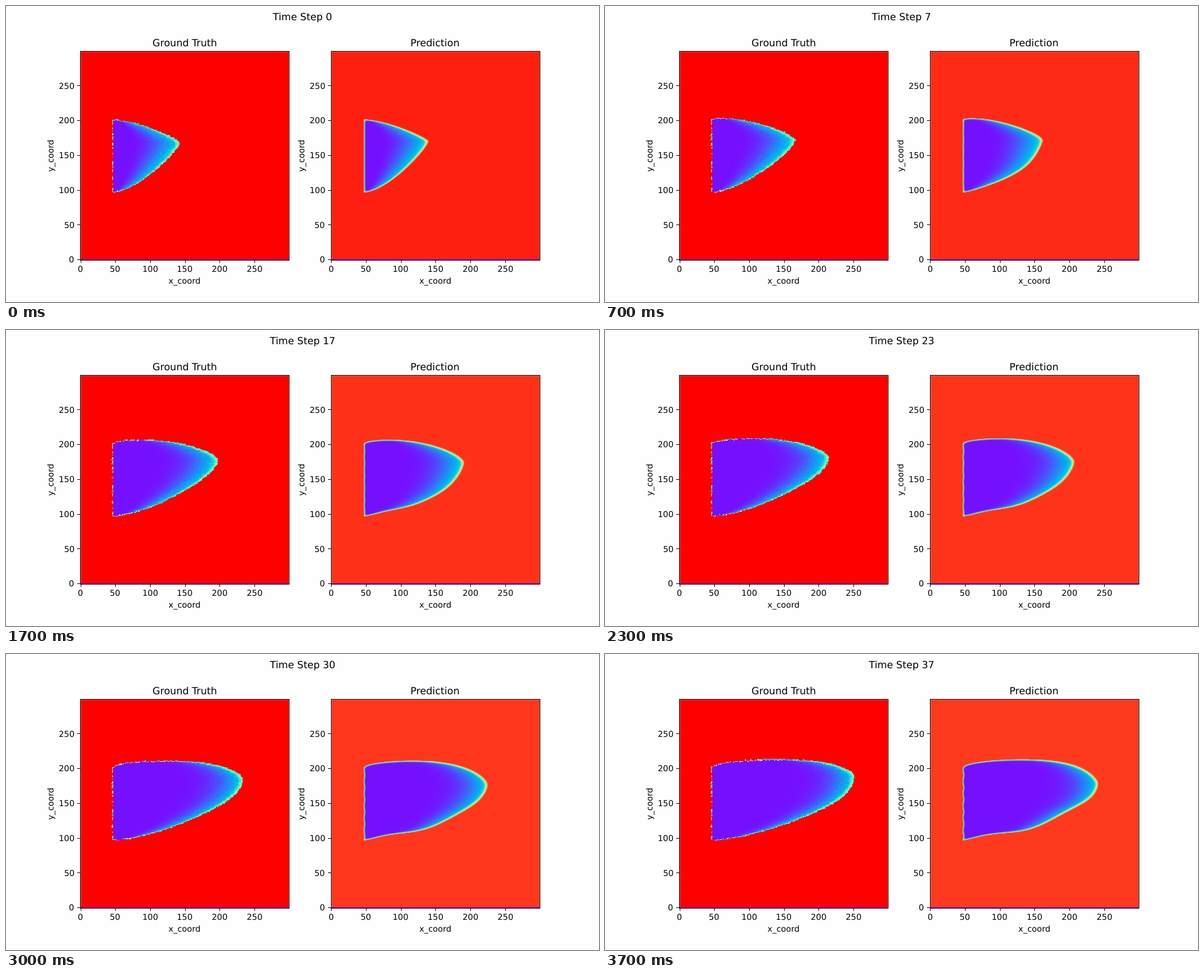
These frames come from a looping animation (1000 px wide and 500 px high, 3.8 s). An HTML page with a canvas:

```html
<!DOCTYPE html>
<html lang="en">
<head>
<meta charset="utf-8">
<title>Time Step</title>
<style>
  html, body { margin: 0; width: 100%; height: 100%; overflow: hidden; background: #fefefe; }
  canvas, svg { position: absolute; left: 0; top: 0; width: 1000px; height: 500px; }
  text { font-family: "DejaVu Sans", sans-serif; font-size: 13.89px; fill: #000; text-rendering: geometricPrecision; }
  .title { font-size: 16.67px; }
</style>
</head>
<body>
<canvas id="stage" width="1000" height="500"></canvas>
<svg id="axes" viewBox="0 0 1000 500"></svg>
<script>
const N = 300, STEPS = 38, STEP_MS = 100;
const SIZE = 352.27, TOP = 76.37, UNIT = SIZE / N;   // axes scale
const BOX = 353, BOX_TOP = 76, CELL = BOX / N;       // pixel-snapped image
const LEFT = 48;

const PANELS = [
  { x: 125, name: "Ground Truth", rough: true },
  { x: 547.73, name: "Prediction", rough: false }
];

const { sin, PI } = Math;
const clamp = v => Math.max(0, Math.min(1, v));
const mix = (a, b, t) => a + (b - a) * t;
const toRow = y => (y - BOX_TOP) / CELL;

function hash(x, y, z = 0) {
  const s = sin(x * 127.1 + y * 311.7 + z * 74.7) * 43758.5453;
  return s - Math.floor(s);
}

function rainbow(v) {
  return [
    255 * Math.min(1, Math.abs(2 * v - 0.5)),
    255 * sin(PI * v),
    255 * Math.cos(PI * v / 2)
  ];
}

// The plume at age 0..1: f runs from its flat left side (0) to the tip (1).
function plume(age, rough) {
  const tipX = (rough ? 169 + 148 * age : 165 + 140 * age) - 21 * age * age;
  const tipY = rough ? mix(231, 207, age) : mix(228, 219, age);
  const body = 0.93 - 0.2 * age;
  const climb = (f, p) => body * f ** p + (1 - body) * (1 - Math.sqrt(1 - f ** 14));
  const swell = 14 * age ** 0.7, bend = 1.6 + 4.4 * age * age;
  const bulge = rough ? 0 : 12 * sin(PI * age ** 0.6);
  const ripple = rough ? 0 : 4.5 * age;
  return {
    tip: tipX / CELL,
    upper: f => toRow(mix(191.5, tipY, climb(f, bend)) - swell * Math.sqrt(4 * f * (1 - f))),
    lower: f => toRow(mix(315, tipY, climb(f, 1.6))
      + bulge * sin(PI * f ** 3) - ripple * sin(2 * PI * f / 0.7) * (1 - f ** 4))
  };
}

function field({ rough }, k, put) {
  const age = k / (STEPS - 1);
  const { tip, upper, lower } = plume(age, rough);
  const length = tip - LEFT;
  const along = x => clamp((x - LEFT) / length);
  const back = rough ? 1 : 1 - Math.asin((31 + 26 * Math.sqrt(age)) / 255) / PI;
  const start = 0.3 + 0.2 * age, power = 1.6 + 1.8 * age;

  // Rightmost point of the plume in each row.
  const reach = new Float32Array(N).fill(-9);
  for (let x = LEFT; x <= tip; x += 0.25) {
    const f = along(x), end = lower(f) - 0.5;
    for (let y = Math.ceil(upper(f) - 0.5); y <= end; y++) reach[y] = x;
  }

  const up = [], low = [];
  for (let x = 0; x < N; x++) {
    const f = along(x + 0.5);
    const shake = z => rough ? (hash(x >> 1, z, k) - 0.5) * 1.8 : 0.3;
    up[x] = upper(f) - shake(1);
    low[x] = lower(f) + shake(2);
  }

  function value(x, y) {
    const cx = x + 0.5, cy = y + 0.5, f = along(cx);
    const spike = rough && hash(y >> 1, 5) > 0.42;
    if (spike && x >= 46 - (hash(y, 8) < 0.4 * age) && x < LEFT && cy > up[LEFT] && cy < low[LEFT])
      return hash(x, y, 3) > 0.35 ? 0.25 + 0.45 * hash(x, y, 4) : back;

    const side = rough ? LEFT : 47 + 0.5 * age * sin(y * 0.36);
    const dl = cx - side;
    const dx = reach[y] - cx + (rough ? (hash(y, 6, k) - 0.5) * 2.4 : 0.4);
    const dy = Math.min(cy - up[x], low[x] - cy);
    if (dl <= 0 || dx <= 0 || dy <= 0) return back;

    const d = 1 / Math.hypot(1 / dx, 1 / dy, rough ? 0 : 1 / dl);
    const q = clamp((cx - LEFT) / (reach[y] - LEFT));
    let v = 0.02 + 0.32 * clamp((q - start) / (1 - start)) ** power;
    if (rough) {
      v *= 0.9 + 0.2 * hash(x >> 1, y >> 1, k);
      if (d < 1.2) return hash(x, y, k) > 0.25 ? 0.3 + 0.4 * hash(x, y, k + 50) : v;
      return mix(v, 0.62, 0.8 * clamp(1 - d / (1.4 + 5 * f ** 3)) ** 1.3);
    }
    return mix(v, back, clamp(1 - d / (2.5 + 3 * f * f)) ** 1.3);
  }

  const base = rainbow(back), floor = rainbow(0);
  for (let y = 0; y < N; y++) {
    for (let x = 0; x < N; x++) {
      const near = y > 75 && y < 215 && x > 40 && x < tip + 3;
      put(x, y, y === N - 1 ? floor : near ? rainbow(value(x, y)) : base);
    }
  }
}

const ctx = document.getElementById("stage").getContext("2d");
const grid = document.createElement("canvas");
grid.width = grid.height = N;
const gridCtx = grid.getContext("2d");
const pixels = gridCtx.createImageData(N, N);

function put(x, y, rgb) {
  const i = (y * N + x) * 4;
  for (let c = 0; c < 3; c++) pixels.data[i + c] = rgb[c];
  pixels.data[i + 3] = 255;
}

const svg = document.getElementById("axes");

function add(tag, attrs) {
  const el = document.createElementNS("http://www.w3.org/2000/svg", tag);
  for (const name in attrs) el.setAttribute(name, attrs[name]);
  return svg.appendChild(el);
}

const bar = (x, y, width, height, fill = "#000") => add("rect", { x, y, width, height, fill });

// Sets text on whole pixels; align 0.5 centres it on x, 1 ends it there.
function place(el, text, x, y, align = 0.5) {
  el.textContent = text;
  el.setAttribute("x", Math.round(x - el.getComputedTextLength() * align));
  el.setAttribute("y", Math.round(y));
}

const label = (text, x, y, align) => place(add("text", {}), text, x, y, align);

function drawAxes({ x, name }) {
  const left = Math.round(x), right = left + 352, bottom = 429, mid = x + SIZE / 2;
  const pale = "rgba(255,250,200,.3)";
  bar(left + 1, 77, 1, 351, pale);
  bar(right - 1, 77, 1, 351, pale);
  bar(left + 2, 77, 349, 1, pale);
  bar(left, 76, 1, 354);
  bar(right, 76, 1, 354);
  bar(left, 76, 353, 1);
  bar(left, bottom, 353, 1);
  for (let v = 0; v <= 250; v += 50) {
    const tx = x + (v + 0.5) * UNIT, ty = TOP + SIZE - (v + 0.5) * UNIT;
    bar(Math.round(tx), bottom, 1, 5);
    bar(left - 5, Math.round(ty), 5, 1);
    label(v, tx, 449, 0.5);
    label(v, x - 9.7, ty + 5.2, 1);
  }
  place(add("text", { class: "title" }), name, mid, 68);
  label("x_coord", mid, 469);
  place(add("text", { transform: `translate(${Math.round(x - 45)} 253) rotate(-90)` }), "y_coord", 0, 0);
}

PANELS.forEach(drawAxes);
const heading = add("text", { class: "title" });

let shown = -1;
function draw(k) {
  if (k === shown) return;
  shown = k;
  place(heading, "Time Step " + k, 500, 24);
  ctx.clearRect(0, 0, 1000, 500);
  for (const panel of PANELS) {
    field(panel, k, put);
    gridCtx.putImageData(pixels, 0, 0);
    ctx.imageSmoothingEnabled = !panel.rough;
    ctx.drawImage(grid, Math.round(panel.x), BOX_TOP, BOX, BOX);
  }
}

const begin = performance.now();
function tick() {
  draw(Math.floor((performance.now() - begin) / STEP_MS) % STEPS);
  requestAnimationFrame(tick);
}
tick();
</script>
</body>
</html>
```
